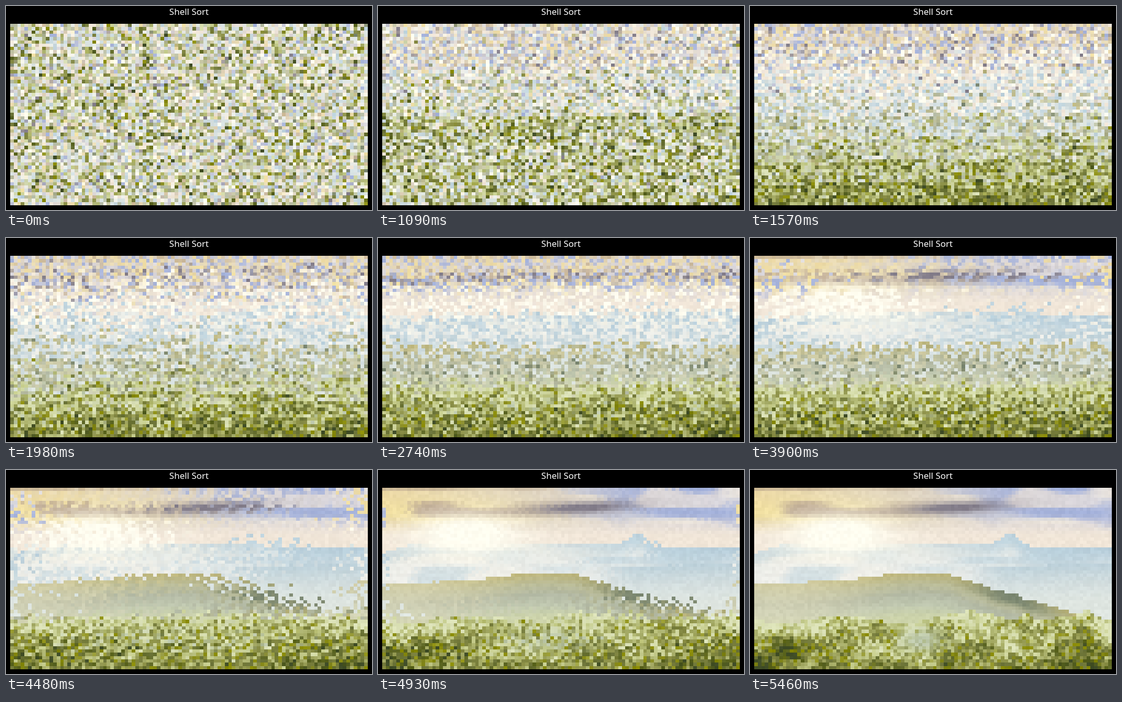
Write an HTML page with a canvas that moves like this. It is 699 by 390 pixels and loops after 7450 ms.

```html
<!DOCTYPE html>
<html lang="en">
<head>
<meta charset="utf-8">
<title>Shell Sort</title>
<style>
  html, body { margin: 0; width: 100%; height: 100%; overflow: hidden; background: #000; }
  h1 {
    position: absolute; left: 0; top: 0; width: 699px; margin: 0;
    font: 500 17px/21px "Noto Sans", "Open Sans", sans-serif;
    color: #fff; text-align: center;
  }
  canvas {
    position: absolute; left: 8px; top: 34px; width: 683px; height: 347px;
    image-rendering: pixelated;
  }
</style>
</head>
<body>
<h1>Shell Sort</h1>
<canvas id="grid" width="100" height="55"></canvas>
<script>
const COLS = 100, ROWS = 55, COUNT = COLS * ROWS;

// Timing in ms
const LOOP = 7450, START = 790, END = 5460, TICK = (END - START) / 164;
const PAUSE_FROM = 1090, PAUSE_TO = 1190;
const MOVE_COST = 0.5;  // work of one move, relative to visiting one element

function seededRandom(seed) {
  return () => {
    seed = (seed + 0x6D2B79F5) | 0;
    let v = Math.imul(seed ^ (seed >>> 15), 1 | seed);
    v = (v + Math.imul(v ^ (v >>> 7), 61 | v)) ^ v;
    return ((v ^ (v >>> 14)) >>> 0) / 4294967296;
  };
}
const random = seededRandom(2024);

// ---- Landscape: u runs left to right, v top to bottom, both from 0 to 1 ----
const clamp = x => Math.max(0, Math.min(1, x));
const smooth = (from, to, x) => {
  const t = clamp((x - from) / (to - from));
  return t * t * (3 - 2 * t);
};
const bump = (x, center, width) => Math.exp(-(((x - center) / width) ** 2));
const rgb = hex => [1, 3, 5].map(i => parseInt(hex.slice(i, i + 2), 16));
const mix = (a, b, t) => a.map((c, i) => c + (b[i] - c) * t);
const tint = (color, hex, amount) => mix(color, rgb(hex), clamp(amount));
const ramp = (colors, t) => {
  const at = clamp(t) * (colors.length - 1), i = Math.min(Math.floor(at), colors.length - 2);
  return mix(rgb(colors[i]), rgb(colors[i + 1]), at - i);
};

const LATTICE = 32;
const lattice = Float32Array.from({ length: LATTICE * LATTICE }, random);
function noise(x, y) {
  const x0 = Math.floor(x), y0 = Math.floor(y);
  const fx = smooth(0, 1, x - x0), fy = smooth(0, 1, y - y0);
  const at = (i, j) => lattice[((y0 + j) % LATTICE) * LATTICE + (x0 + i) % LATTICE];
  const top = at(0, 0) + (at(1, 0) - at(0, 0)) * fx;
  const bottom = at(0, 1) + (at(1, 1) - at(0, 1)) * fx;
  return top + (bottom - top) * fy;
}

const mountainLine = u => 0.305 + 0.03 * smooth(0.7, 0.85, u)
  + 0.05 * smooth(0.1, 0, u) - 0.05 * bump(u, 0.715, 0.03);
const hillLine = u => 0.52 - 0.055 * bump(u, 0.46, 0.17) + 0.5 * Math.max(0, u - 0.55)
  - 0.035 * bump(u, 0.72, 0.09) * noise(u * 30, 3);
const canopyLine = u => 0.725 + 0.02 * Math.sin(u * 19) - 0.03 * bump(u, 0.64, 0.1)
  - 0.06 * bump(u, 0.76, 0.015) - 0.03 * bump(u, 0.93, 0.02);

function sky(u, v) {
  const cloud = noise(u * 7 + 2, v * 22), patch = noise(u * 9 + 11, v * 14 + 5);
  const high = smooth(0.27, 0.12, v);
  let color = ramp(['#ecd9a6', '#e4d8c0', '#ded8d6', '#d8d6de'], u);
  color = tint(color, '#f2e09c', bump(u, 0.13, 0.28) * bump(v, 0.15, 0.09));
  color = tint(color, '#f1e6d8', smooth(0.14, 0.28, v));
  color = tint(color, '#b9a48c', high * smooth(0.4, 0.8, cloud) * smooth(0.6, 0.3, u));
  color = tint(color, '#a2b0da', high * smooth(0.35, 0.7, patch) * smooth(0.35, 0.85, u));
  color = tint(color, '#f6eedc', high * smooth(0.55, 0.85, cloud) * smooth(0.45, 0.6, u));
  return tint(color, '#837d8a', 1.2 * bump(u, 0.56, 0.14) * bump(v, 0.11 - 0.1 * (u - 0.56), 0.032));
}

function mountains(u, v) {
  const line = mountainLine(u), ridge = 0.42 + 0.04 * (1 - u);
  let color = ramp(['#e2e6e2', '#f4efe0', '#dbe2e0', '#bdd3de', '#b7cedb'], u);
  color = tint(color, '#efefea', 0.85 * smooth(line, line + 0.15, v));
  color = tint(color, '#b8d0dc', 0.5 * smooth(0.45, 0.8, noise(u * 6, v * 20)));
  if (v > ridge) {
    const mist = ramp(['#bdd1da', '#d3dedf', '#dfe6e1'], (v - ridge) / 0.2);
    color = mix(color, mist, smooth(0.55, 0.72, u));
  }
  return color;
}

function hill(u, v) {
  const depth = v - hillLine(u);
  let color = ramp(['#bfb678', '#bcbd98', '#b3b9a4', '#c0c8b0', '#ccd3aa'], depth / 0.24);
  color = tint(color, '#dedbbc', 0.6 * smooth(0.45, 0.1, u));
  return tint(color, '#76836f', 0.95 * bump(u, 0.72, 0.11) * smooth(0.09, 0.03, depth));
}

function foliage(u, v) {
  const depth = v - canopyLine(u);
  const clump = noise(u * 11, v * 9) + 0.5 * noise(u * 26, v * 18) - 0.75;
  const leftTree = bump(u, 0.06, 0.09) * smooth(0, 0.08, depth);
  const light = 0.87 - 1.6 * depth + 0.65 * clump - 0.3 * leftTree + 0.55 * (random() - 0.5);
  let color = ramp(['#3f4c26', '#566018', '#6b7338', '#8b8f45', '#aab06c', '#c8cf90', '#dce2b8'], light);
  color = tint(color, '#8e8f00', 0.9 * smooth(0.7, 1, random()) * smooth(0.9, 0.5, light));
  return tint(color, '#b6c3ae', 0.8 * bump(u, 0.47, 0.06) * bump(v, 0.84, 0.06));
}

function landscape(u, v) {
  if (v > canopyLine(u)) return foliage(u, v);
  if (v > hillLine(u)) return hill(u, v);
  const color = v > mountainLine(u) ? mountains(u, v) : sky(u, v);
  const fromSun = Math.hypot((u - 0.24) / 0.2, (v - 0.26) / 0.15);
  return tint(color, '#fffdf0', 1.3 * bump(fromSun, 0, 0.8));
}

function paintLandscape() {
  return Uint32Array.from({ length: COUNT }, (_, i) => {
    const u = (i % COLS + 0.5) / COLS, v = (Math.floor(i / COLS) + 0.5) / ROWS;
    const grain = (random() - 0.5) * 10;
    const [r, g, b] = landscape(u, v).map(c => Math.round(Math.max(0, Math.min(255, c + grain))));
    return (255 << 24 | b << 16 | g << 8 | r) >>> 0;
  });
}

// ---- Sorting ----
function shuffledOrder() {
  const order = Uint16Array.from({ length: COUNT }, (_, i) => i);
  for (let i = COUNT - 1; i > 0; i--) {
    const j = Math.floor(random() * (i + 1));
    [order[i], order[j]] = [order[j], order[i]];
  }
  return order;
}

// Shell sort that stops once the given amount of work is spent.
function shellSort(budget) {
  const order = shuffled.slice();
  let work = 0;
  for (let gap = COUNT >> 1; gap > 0; gap >>= 1) {
    for (let i = gap; i < COUNT; i++) {
      if (work >= budget) return { order, work };
      const value = order[i];
      let j = i;
      for (; j >= gap && order[j - gap] > value; j -= gap) {
        order[j] = order[j - gap];
        work += MOVE_COST;
      }
      order[j] = value;
      work++;
    }
  }
  return { order, work };
}

// Progress advances in ticks, with one short pause early in the sort.
function progress(t) {
  if (t < START) return 0;
  if (t >= END) return 1;
  if (t >= PAUSE_FROM && t < PAUSE_TO) t = PAUSE_FROM;
  const ticks = Math.floor((t - START) / TICK) + 1;
  return ticks * TICK / (END - START + TICK);
}

const colors = paintLandscape();
const shuffled = shuffledOrder();
const totalWork = shellSort(Infinity).work;
const view = document.getElementById('grid').getContext('2d');
const picture = view.createImageData(COLS, ROWS);
const cells = new Uint32Array(picture.data.buffer);
let shown = -1;

function draw(time) {
  const done = progress(time % LOOP);
  if (done === shown) return;
  shown = done;
  shellSort(done * totalWork).order.forEach((home, i) => { cells[i] = colors[home]; });
  view.putImageData(picture, 0, 0);
}

const origin = performance.now();
function frame() {
  draw(performance.now() - origin);
  requestAnimationFrame(frame);
}
frame();
</script>
</body>
</html>
```
